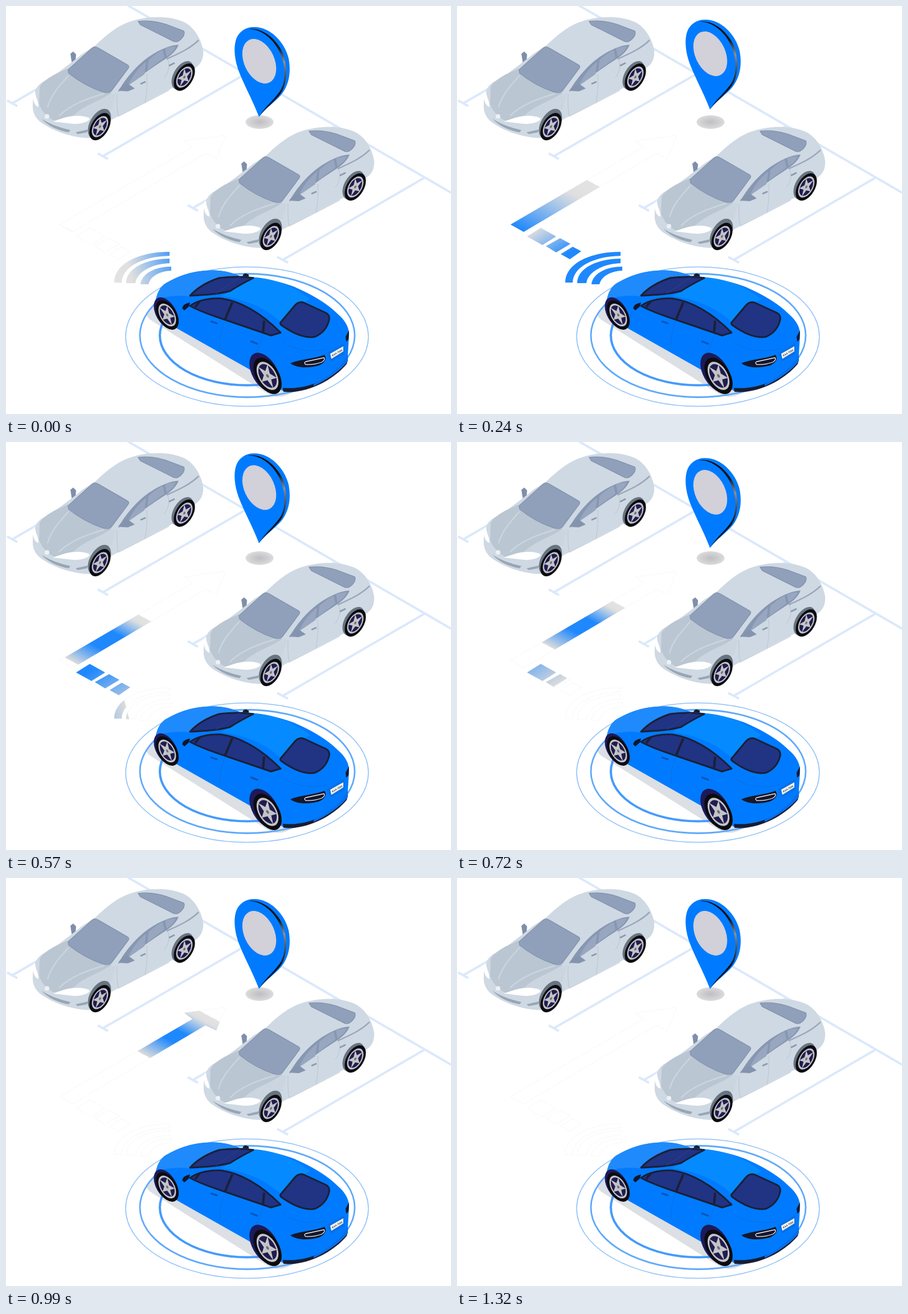
Write an HTML page that moves like this. It is 781x717 px and loops after 1390 ms.

```html
<!DOCTYPE html>
<html lang="en">
<head>
<meta charset="utf-8">
<title>Guided parking</title>
<style>
html, body { margin: 0; width: 100%; height: 100%; overflow: hidden; background: #fff; }
svg { display: block; width: 781px; height: 717px; }
.lines { fill: none; stroke: #dbe9fb; stroke-width: 4; }
.ghost { fill: none; stroke: #ececec; stroke-width: .8; stroke-dasharray: 2 2; }
.rings { fill: none; }
.seam { fill: none; stroke: #b9c5d1; stroke-width: 1; }
.glass { fill: #91a0ba; stroke: #8595b0; stroke-width: 1.5; stroke-linejoin: round; }
.tint { fill: #213383; stroke: #1a2036; stroke-width: 3; stroke-linejoin: round; }
</style>
</head>
<body>
<svg viewBox="0 0 781 717">
<defs>
  <linearGradient id="gArrow" gradientUnits="userSpaceOnUse" x1="-2" x2="3" y1="0" y2="0" gradientTransform="matrix(280 -162.5 24 13 106 390.5)"/>
  <linearGradient id="gDash" gradientUnits="userSpaceOnUse" x1="-2" x2="3" y1="0" y2="0" gradientTransform="matrix(-73 -43 24 -15 208 440)"/>
  <linearGradient id="gWave" gradientUnits="userSpaceOnUse" x1="-2" x2="3" y1="0" y2="0" gradientTransform="matrix(-100 26 26 100 290 460)"/>
  <linearGradient id="gRim" x1="0" y1="0" x2="0" y2="1">
    <stop offset="0" stop-color="#05070c"/><stop offset=".22" stop-color="#15181f"/>
    <stop offset=".38" stop-color="#8b8f98"/><stop offset=".55" stop-color="#4b4f58"/>
    <stop offset=".75" stop-color="#0a0c12"/><stop offset="1" stop-color="#0a2a5c"/>
  </linearGradient>
  <radialGradient id="gSpot">
    <stop offset="0" stop-color="#bfbfc1"/><stop offset=".6" stop-color="#cfcfd1"/><stop offset="1" stop-color="#dcdcde"/>
  </radialGradient>

  <path id="arrow" d="M94 384L327 248L313 237L386 227L369 268L350 259L117 397Z"/>
  <path id="dash" d="M147 390L174 405L150 420L123 405ZM181 408L199 418L174 433L156 422ZM203 423L218 431L198 445L182 436Z"/>
  <path id="wave" d="M287 432C235 432 190 452 190 486H203C204 458 240 440 287 439ZM287 444C248 444 211 460 211 487H227C229 468 255 453 287 452ZM290 458C262 458 238 470 236 489H250C253 476 268 466 290 465Z"/>

  <g id="wheel">
    <circle r="20" fill="#0b0b12"/>
    <circle r="15.500" fill="#c4c4c7"/>
    <circle r="13" fill="#1f1d50"/>
    <path d="M0-14L3.200-4.400L13.300-4.300L5.200 1.700L8.200 11.300L0 5.500L-8.200 11.300L-5.200 1.700L-13.300-4.300L-3.200-4.400Z" fill="#c4c4c7"/>
    <circle r="2" fill="#6b6c75"/>
  </g>

  <g id="sedan">
    <path d="M113 84L118 80L123 85L122 98L116 103Z" fill="#7f8fab"/>
    <path d="M47 172C47 155 52 142 62 135L84 122C100 111 118 97 134 84L156 70C180 47 200 32 222 26C248 18 285 16 312 28C330 37 342 56 346 78C347 90 344 101 332 109L294 143L187 199L152 232C120 233 85 221 62 205C50 196 46 185 47 172Z" fill="#cfd9e3"/>
    <path d="M59 143C62 135 72 128 84 121L108 110C128 130 152 146 186 153C165 165 140 178 122 191L90 204C75 198 64 188 58 172Z" fill="#bac6d2"/>
    <path d="M110 122C96 138 79 155 73 178M172 154C145 162 115 172 93 193" fill="none" stroke="#cad5df" stroke-width="2.5"/>
    <path d="M182 157C162 166 132 178 118 193L148 194L186 181L193 153Z" fill="#cad5df"/>
    <path class="glass" d="M109 112L151 74Q156 70 162 74L214 104Q217 106 214 110L185 149Q181 154 170 151C148 144 126 131 110 118Z"/>
    <path class="glass" d="M232 27C246 25 264 27 280 32L312 44C315 50 309 58 302 62Q297 64 292 61L236 33Z"/>
    <path d="M197 151C204 136 224 109 247 92C265 79 285 69 303 68C299 78 291 86 280 93C255 109 225 131 197 151Z" fill="#8797b2"/>
    <path d="M214 140C222 122 232 109 246 98L243 120ZM250 95C259 87 267 81 275 77L278 91L248 113ZM279 75C286 72 292 71 298 71C295 79 289 84 282 89Z" fill="#98a7bf"/>
    <path d="M338 60C324 74 305 83 282 93" fill="none" stroke="#9aa7b9" stroke-width="2.5"/>
    <path class="seam" d="M195 155Q194 178 197 194L244 170M247 119Q249 143 244 170L286 148M284 94Q290 110 278 126"/>
    <path d="M236 137L245 133M286 105L296 100" stroke="#8b9ab0" stroke-width="3"/>
    <path d="M197 149C200 143 208 137 215 137L226 145L214 150Z" fill="#8594ae"/>
    <path d="M82 203L100 197C115 192 138 191 147 198C145 204 130 208 117 207Z" fill="#fff"/>
    <path d="M47 153L51 149C51 160 58 168 57 177C50 176 46 164 47 153Z" fill="#fff"/>
    <path d="M62 198C75 207 95 214 113 218L110 222C92 219 74 211 62 198ZM122 222L144 217L142 222L126 225Z" fill="#98a5b5"/>
    <circle cx="72" cy="194" r="4" fill="#edf1f5"/>
    <circle r="23.500" transform="matrix(.866 -.5 0 1 164 207)" fill="#68747f"/>
    <circle r="22.500" transform="matrix(.866 -.5 0 1 310 122)" fill="#68747f"/>
    <use href="#wheel" transform="matrix(.93 -.54 0 1.070 165 212)"/>
    <use href="#wheel" transform="matrix(.93 -.54 0 1.070 313 125)"/>
  </g>
</defs>

<path class="lines" d="M214-1L781 328M11 171L250 33M170 264L421 119M328 355L580 210M486 446L734 302M2 166L20 176M161 259L179 269M319 350L337 360M476 441L495 451"/>

<use href="#sedan"/>
<use href="#sedan" x="300" y="193"/>

<g class="ghost"><use href="#arrow"/><use href="#dash"/><use href="#wave"/></g>
<use href="#arrow" id="lit" fill="url(#gArrow)"/>
<use href="#dash" fill="url(#gDash)"/>
<use href="#wave" fill="url(#gWave)"/>

<ellipse cx="445" cy="204" rx="24.500" ry="12" fill="url(#gSpot)"/>
<g id="pin">
  <path d="M444 195C433 165 413 130 406 107C400 87 400 70 404 58C409 45 420 37 435 37C462 36 489 62 496 92C501 118 496 140 483 156C472 169 456 179 444 195Z" fill="#007bff"/>
  <path d="M424 41C447 39 471 58 482 85C491 108 491 130 483 146C475 161 455 176 445 193C458 177 478 163 486 147C494 128 494 106 486 83C474 56 447 36 424 41Z" fill="url(#gRim)"/>
  <ellipse cx="444.500" cy="97" rx="26.500" ry="41.500" transform="rotate(-25 444.500 97)" fill="#d2d0d9"/>
</g>

<path d="M264 528C243 534 240 545 262 557L460 682C475 690 490 687 502 679L440 620Z" fill="#dcdfe4"/>
<g class="rings">
  <ellipse cx="423" cy="581" rx="213" ry="122.500" stroke="#8fc0f9" stroke-width="1.500"/>
  <ellipse cx="423.500" cy="579" rx="188.500" ry="108.500" stroke="#5fa9fb" stroke-width="2.800"/>
  <ellipse cx="423.500" cy="579" rx="153.500" ry="87.500" stroke="#459bfc" stroke-width="4"/>
</g>

<g id="coupe">
  <path d="M415 475Q416 470 421 470L426 472V477Z" fill="#141a30"/>
  <path d="M262 522C264 505 271 494 280 488C300 475 325 466 352 465C375 463 392 467 410 474C440 476 475 482 502 492C530 503 562 521 582 541C596 553 603 566 602 580L600 612C597 630 580 645 558 657C535 669 510 676 487 677L428 639L299 566L266 540Z" fill="#007bff"/>
  <path d="M263 516C266 500 273 491 282 486C304 474 328 466 352 465C375 463 392 467 408 474C378 476 346 488 321 510C302 508 278 510 263 516Z" fill="#1f8afb"/>
  <path d="M378 510L436 477C472 479 505 493 534 515C517 524 498 537 483 556C455 530 420 515 378 510Z" fill="#058bff"/>
  <path class="tint" d="M323 509C335 496 352 485 374 478Q405 474 434 478C418 486 404 494 393 501C370 507 345 508 323 509Z"/>
  <path d="M368 506L412 475" stroke="#31408c" stroke-width="1"/>
  <path class="tint" d="M323 527C338 516 360 513 378 514C420 520 455 547 482 574L465 579L386 552C365 545 343 538 323 527Z"/>
  <path d="M397 521L384 552M453 553L451 575M340 519L332 529" stroke="#1a2036" stroke-width="4"/>
  <path class="tint" d="M482 556L508 525Q514 519 522 521L561 539Q569 543 567 552C564 565 556 575 543 581C526 585 505 576 485 562Q480 559 482 556Z"/>
  <path d="M309 531Q311 523 323 521L321 528L313 535Z" fill="#11162a"/>
  <path d="M385 553Q374 574 376 600M451 576Q448 598 431 620M308 535Q300 550 305 562M486 590C505 605 540 610 566 602" fill="none" stroke="#0a6ee2" stroke-width="1"/>
  <path d="M359 554L371 558M429 589L442 594" stroke="#0b55b8" stroke-width="3"/>
  <path d="M499 628C510 622 540 620 559 613C564 620 559 628 548 632C530 637 510 636 499 628Z" fill="#15182c"/>
  <path d="M526 625L558 618Q561 622 554 626Q540 631 526 630Q522 627 526 625Z" fill="none" stroke="#f2f4f8" stroke-width="1.300"/>
  <path d="M596 581L602 570L601 586L597 590Z" fill="#15182c"/>
  <path d="M563 610L594 592L594 612L570 625Z" fill="#0870e6"/>
  <path d="M569 611L592 598V607L571 620Z" fill="#f4f6f9"/>
  <text x="573" y="616" transform="rotate(-30 573 616)" font-family="Liberation Sans, sans-serif" font-weight="700" font-size="4.500" fill="#333">KXA 7205</text>
  <path d="M486 671C520 674 545 664 566 650L600 622L598 629C572 660 525 682 487 678Z" fill="#171c33"/>
  <path d="M540 664C565 652 590 634 600 612L600 624C588 640 565 656 540 668Z" fill="#0a6ee8"/>
  <circle r="25" transform="matrix(.866 .5 0 1 281 540)" fill="#1d1a5a"/>
  <circle r="31" transform="matrix(.866 .5 0 1 454 644)" fill="#1d1a5a"/>
  <use href="#wheel" transform="matrix(1 .58 0 1.160 283 543)"/>
  <use href="#wheel" transform="matrix(1.240 .72 0 1.430 459 650)"/>
</g>
</svg>
<script>
const LOOP = 1390, STEP = 30, LAST = 1320;
const GREY = '#dcdcdc', BLUE = '#1f88fd';

// Head and tail cross the path start at `at` and take `ms` to cover it; `fade` is their soft length.
const bands = {
  gWave: { head: { at: 40, ms: 165, fade: 1.25 }, tail: { at: 468, ms: 135, fade: 1.1 } },
  gDash: { head: { at: 225, ms: 100, fade: 1.2 }, tail: { at: 655, ms: 170, fade: 1.35 } },
  gArrow: { head: { at: 240, ms: 1030, fade: .175, glow: .48 }, tail: { at: 540, ms: 920, fade: .16 } }
};

const clamp = (v, lo, hi) => Math.max(lo, Math.min(hi, v));

const stops = {};
for (const id in bands) {
  const grad = document.getElementById(id);
  stops[id] = [0, 1, 1, 1, .9, .8, 0].map((alpha, n) => {
    const stop = document.createElementNS(grad.namespaceURI, 'stop');
    stop.setAttribute('stop-color', n === 2 || n === 3 ? BLUE : GREY);
    stop.setAttribute('stop-opacity', alpha);
    return grad.appendChild(stop);
  });
}
const pin = document.getElementById('pin');
const lit = document.getElementById('lit');

// Stop places along the path, from the tail edge to the head edge.
function places({ head, tail }, t) {
  const back = (t - tail.at) / tail.ms;
  const front = (t - head.at) / head.ms;
  const glow = Math.min(head.glow || -9, t / 500);
  const edge = Math.max(front + head.fade, glow);
  const grey = front + (edge - front) * .75;
  return [back, back, back + tail.fade, front, grey, edge, edge];
}

function draw() {
  const t = Math.min(LAST, Math.floor(performance.now() % LOOP / STEP) * STEP);
  for (const id in bands) {
    let last = -2;
    places(bands[id], t).forEach((u, n) => {
      last = clamp(u, last, 3);
      stops[id][n].setAttribute('offset', (last + 2) / 5);
    });
  }
  lit.setAttribute('opacity', clamp((LAST - t) / 150, 0, 1));
  const lift = 24 * Math.max(0, 1 - Math.abs(t - 440) / 440);
  pin.setAttribute('transform', `translate(0 ${-lift})`);
  requestAnimationFrame(draw);
}
draw();
</script>
</body>
</html>
```
